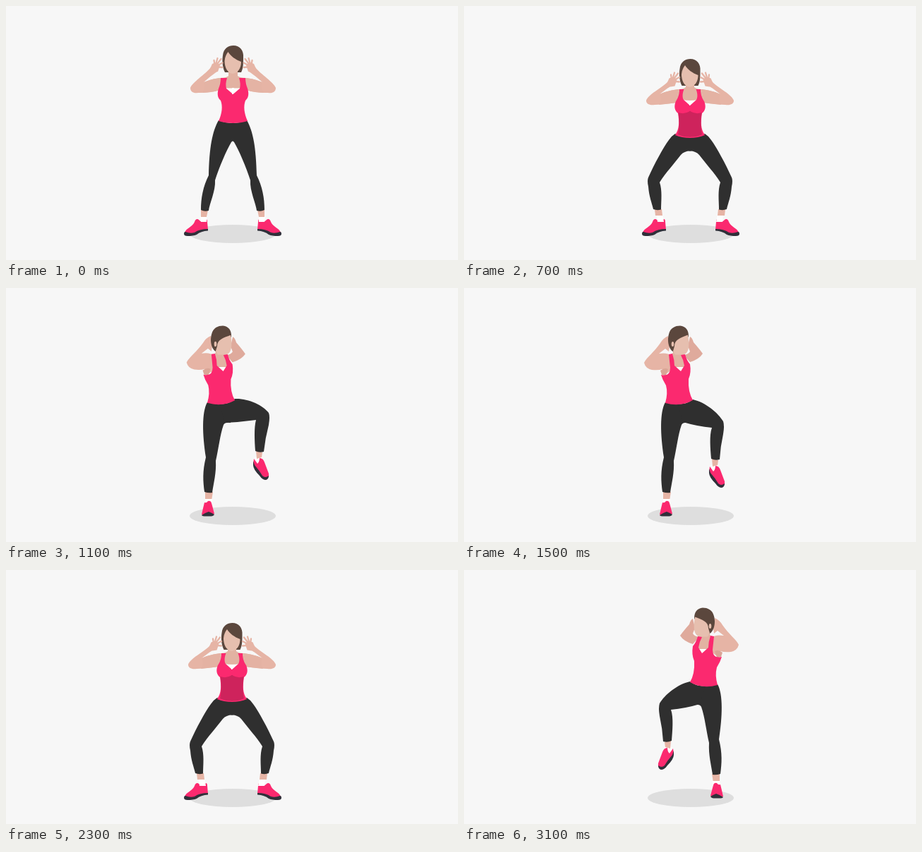
An HTML page with a canvas for the animation above (3200 ms loop, 640 by 360 pixels).

```html
<!DOCTYPE html>
<html lang="en">
<head>
<meta charset="utf-8">
<title>Squat and knee lift</title>
<style>
html, body { margin: 0; width: 100%; height: 100%; overflow: hidden; background: #f7f7f7; }
canvas { display: block; width: 640px; height: 360px; }
</style>
</head>
<body>
<canvas id="stage" width="640" height="360"></canvas>
<script>
const ctx = document.getElementById('stage').getContext('2d');
const LOOP = 3200;
const C = {
  bg: '#f7f7f7', shadow: '#dedede', pink: '#fb296f', deep: '#ce235c', black: '#2f2f2f',
  skin: '#e6b4a5', chest: '#e2b2a2', face: '#e6bfaf', shade: '#daa596', hair: '#5b473d',
  white: '#ffffff', sole: '#30303a'
};

const cache = {};
function fill(d, color) {
  ctx.fillStyle = color;
  ctx.fill(cache[d] || (cache[d] = new Path2D(d)));
}
function ellipse(x, y, rx, ry, color) {
  ctx.fillStyle = color;
  ctx.beginPath();
  ctx.ellipse(x, y, rx, ry, 0, 0, 7);
  ctx.fill();
}
function shift(x, y, draw) {
  ctx.save();
  ctx.translate(x, y);
  draw();
  ctx.restore();
}
function flip(axis, draw) {
  ctx.save();
  ctx.translate(2 * axis, 0);
  ctx.scale(-1, 1);
  draw();
  ctx.restore();
}
function both(axis, draw) {
  draw();
  flip(axis, draw);
}

// Front view: left halves, mirrored on their axis
const stand = {
  axis: 321.5, legAxis: 321, head: [0, 0], hand: [0, 0], armShade: '#e4b3a4',
  arm: 'M303 102C294 103 288 105 280 108Q290 99 300 92L290 87C282 97 264 108 261 116C261 122 266 124 272 123C284 123 295 122 302 119Z',
  upper: 'M280 108C288 105 294 103 303 102L302 119C295 122 288 122 278 123Q284 115 280 108Z',
  chest: 'M315 88V99Q312 102 303 102L302 120L323 126V88Z',
  bra: 'M310 116Q316 117 323 116V127Z',
  top: 'M304 102H313C311 108 311 113 312 117L321.5 125H323V166C314 166 307 165 301 163C306 152 307 142 304 134C299 130 299 123 301 117C303 112 304 107 304 102Z',
  leg: 'M301 162C292 178 288 200 287 240C279 256 276 272 276 289Q281 292 287 290C288 280 297 262 296 247C302 228 312 205 319 193Q320 191 323 191V166Q310 166 301 162Z',
  ankle: 'M276 289H286L284 299H276Z',
  sock: 'M275 298H284L284 306H276Z'
};
const dip = {
  axis: 320, legAxis: 320, head: [-1.5, 19], hand: [-1.5, 20.5], armShade: '#e4b2a3',
  arm: 'M304 118C294 119 286 121 277 125Q288 116 299 110L289 107C280 116 260 126 258 134C258 139 263 141 270 140C284 139 294 138 300 137Z',
  upper: 'M277 125C287 121 294 119 304 118L300 137C294 138 286 139 276 140Q281 133 277 125Z',
  chest: 'M314 107V115Q311 118 304 118L300 136L321 142V107Z',
  bra: 'M309 133Q315 134 321 134V143Z',
  top: 'M305 118H311.5C309 124 309 130 311 133L320 141H321V187Q308 187 299 183C305 174 305 165 303 152C298 148 297 142 300 135C304 129 305 124 305 118Z',
  panel: 'M303.5 151Q312 154 320 149H321V185.5Q311 186 303 182Q306 168 303.5 151Z',
  leg: 'M299 181Q294 184 290 190C282 201 270 223 261 243Q259 247 261 256C262 270 266 279 268 288Q273 290 279 288.5C279 276 281 262 277 250C285 237 298 223 307 211Q312 205.5 320 205.5H321V186Q308 186 299 181Z',
  ankle: 'M270 288H280L281 297H271Z',
  sock: 'M273 296H281L283 306H274Z'
};
const squat = {
  axis: 320, legAxis: 321.5, head: [-1, 50], hand: [-2, 52], armShade: C.shade,
  arm: 'M304 149C295 150 288 152 280 155Q290 147 300 141L289 138C280 147 259 155 256 163C257 168 264 169 270 168C284 169 294 170 298 171Z',
  upper: 'M280 155C288 151 295 149 304 149L298 171C292 168 280 168 270 168Q280 161 280 155Z',
  chest: 'M314 138V146Q311 149 303 149L298 171L321 177V138Z',
  bra: 'M308 168H321V178Z',
  top: 'M304 148H310C308 155 307 161 309 168L320 177H321V190H301V185C296 181 294 175 298 169C302 162 303 155 304 148Z',
  panel: 'M301 185Q311 189 320 184H321V217Q307 217 298 212Q305 204 303 197Z',
  leg: 'M299 211C285 219 262 232 252 244Q248 249 250 259Q258 274 264 290Q270 292 276 288C274 278 278 264 274 254C290 250 306 242 314 238Q317 236 323 236V216Q308 217 299 211Z',
  ankle: 'M266 291L277 289L279 299L269 300Z',
  sock: 'M270 299L280 297L283 306H274Z'
};

function frontHead() {
  fill('M310 94C306 86 306 76 307 70C308 60 315 56 322 56C331 56 337 63 336 73C336 82 336 88 333 94Z', C.hair);
}
function frontFace() {
  fill('M314.5 65C318 71 325 76 333 79C333 87 329 95 321 96C313 95 309.5 86 309.5 78C310 72 312 68 314.5 65Z', C.face);
}
function frontHand() {
  fill('M288 91L292 82Q298 78 303 84L300 93L294 94Z', C.skin);
  ctx.strokeStyle = C.skin;
  ctx.lineCap = 'round';
  ctx.lineWidth = 2.3;
  ctx.beginPath();
  for (const [x, y] of [[294.5, 77], [299.5, 74], [304.5, 75], [306.5, 80.5], [306.5, 87]]) {
    ctx.moveTo(296, 86);
    ctx.lineTo(x, y);
  }
  ctx.stroke();
}
function sideShoe() {
  fill('M253 321C255 315 264 313 267 306C268 302 271 301 273 303Q276 307 281 305L283 302Q285 302 285 306L286 317Q276 318 270 322Q262 325 254 324Z', C.pink);
  fill('M252 323Q252 320 254 320Q261 323 267 321Q274 316 286 316V318.5Q276 319 270 324Q265 326 257 326Q252 326 252 323Z', C.sole);
}
function front(p) {
  both(321, sideShoe);
  both(p.legAxis, () => {
    fill(p.sock, C.white);
    fill(p.ankle, C.skin);
    fill(p.leg, C.black);
  });
  shift(...p.head, frontHead);
  both(p.axis, () => {
    fill(p.arm, C.skin);
    fill(p.upper, p.armShade);
    shift(...p.hand, frontHand);
    fill(p.chest, C.chest);
  });
  both(p.axis, () => {
    fill(p.bra, C.white);
    fill(p.top, C.pink);
  });
  if (p.panel) both(p.axis, () => fill(p.panel, C.deep));
  shift(...p.head, frontFace);
}

// Turned view, facing right
const turn = {
  head: [0, 0], lean: 0, farColor: C.skin,
  far: 'M321 69Q327 67 336 72C341 79 351 89 355 95Q354 100 348 103Q336 108 325 110L318 96Q328 95 335 91L334 86L324 83L330 79L321 78Z',
  near: 'M294 70C284 73 274 81 268 88C262 94 253 99 251 105Q252 112 259 113Q273 114 283 112L288 124L297 110V95Q286 94 271 98L281 86L294 89V86L287 82L294 81Z',
  chest: 'M300 84V92Q299 96 291 97L292 118L309 121L322 110L316 95L314 84Z',
  bra: 'M302 112H317L310 121Z',
  top: 'M291 97L296 96Q299 102 299 110L309 119L316 111Q315 103 312 97L318 95Q321 104 327 112Q328 122 324 130Q322 145 329 160Q308 163 290 160Q293 145 291 135Q286 128 285 123Q294 116 291 97Z',
  support: 'M290 159C282 174 280 208 284 236C280 258 280 274 281 289Q287 291 293 290C295 276 299 262 298 246C302 228 305 210 309 200Q312 194 318 196L328 160Z',
  swing: 'M300 161Q315 162 329 159C337 177 347 199 354 225Q359 248 360 269Q354 272 348 271C345 257 339 246 336 232C331 220 318 211 312 198Z',
  ankle: 'M349 270L360 269L361 280L351 282Z',
  sock: 'M351 281L361 279L363 288L354 290Z',
  shoe: 'M353 287Q357 289 358 285L363 285Q365 288 368 296Q372 306 371 313Q368 318 363 317Q357 313 355 301Z',
  sole: 'M357 310Q362 315 371 310L371 314Q368 318 364 318Q358 316 357 310Z'
};
const lift = {
  head: [-4, -1.5], lean: 0, farColor: '#dfaa9c',
  far: 'M320 69Q323 70 325 77Q333 86 338 93Q333 101 320 105L311 95Q318 94 320 90L317 82Z',
  near: 'M289 68Q282 71 278 78C270 90 258 99 255 106Q257 114 266 116Q275 117 281 115L283 124L294 116V96Q288 91 276 93L285 86L290 90L291 83Z',
  pit: 'M278 117Q284 112 289 115L286 124L280 123Z',
  chest: 'M296 82V91Q295 95 290 96L291 120L307 121L318 108L312 94L311 82Z',
  bra: 'M300 112H313L308 121Z',
  top: 'M290 94L295 93Q298 102 298 110L307 118L312 110Q311 102 307 95L313 94Q315 102 320 108Q322 120 318 129Q317 147 324 159Q306 169 285 163Q289 149 286 138Q281 130 279 123Q292 126 292 113Z',
  support: 'M285 162C277 176 278 208 283 240C278 260 279 274 281 289Q287 291 292 290C294 276 298 262 297 245C301 228 303 208 308 194Q310 190 318 191L324 160Q306 168 285 162Z',
  swing: 'M303 166Q315 165 324 158C342 162 360 177 367 189Q369 195 367 207Q363 225 362 243Q356 245 350 242C349 229 347 209 351 198Q330 196 310 190Z',
  ankle: 'M351 242L360 244L359 251L352 253Z',
  sock: 'M349 251L359 250L359 258L351 260Z',
  shoe: 'M348 253Q351 257 353 260Q356 257 356 252Q361 252 363 258L369 274Q370 280 365 283Q360 281 357 276Q349 269 347 261Z',
  sole: 'M347 256L349 262Q356 270 360 277Q364 281 369 277Q369 282 365 283Q360 283 356 277Q347 268 347 262Z'
};
const knee = Object.assign({}, lift, {
  lean: 0.012,
  swing: 'M303 166Q315 165 324 157C342 156 364 166 372 177Q374 182 372 194Q367 213 365 232Q359 234 353 231C352 217 351 198 354 187Q332 190 310 191Z',
  foot: [3, -11]
});

function turnedHead() {
  fill('M301 92C295 90 291 78 294 67C296 58 303 55 310 55C318 56 322 61 322 70L316 80L303 92Z', C.hair);
  fill('M321 68C310 72 302 75 302 84L300 91L303 96H315Q321 94 322 86Q323 78 321 68Z', C.face);
  ellipse(299.5, 81, 1.8, 3.6, C.face);
}
function frontShoe() {
  fill('M282 289H293L291 301H282Z', C.skin);
  fill('M282 299H292V306H282Z', C.white);
  fill('M277 321Q279 312 281 304Q284 305 286 302Q290 301 291 305Q293 312 295 320Q286 325 277 321Z', C.pink);
  fill('M277 322Q281 319 287 317Q292 319 295 321Q294 324 286 323.5Q278 324 277 322Z', C.sole);
}
function turned(p) {
  frontShoe();
  shift(...(p.foot || [0, 0]), () => {
    fill(p.sock, C.white);
    fill(p.ankle, C.skin);
    fill(p.shoe, C.pink);
    fill(p.sole, C.sole);
  });
  fill(p.support, C.black);
  fill(p.swing, C.black);
  ctx.save();
  ctx.translate(304, 163);
  ctx.rotate(p.lean);
  ctx.translate(-304, -163);
  fill(p.far, p.farColor);
  fill(p.chest, C.chest);
  fill(p.near, C.skin);
  if (p.pit) fill(p.pit, C.shade);
  shift(...p.head, turnedHead);
  fill(p.bra, C.white);
  fill(p.top, C.pink);
  ctx.restore();
}

// Half-loop timing: [start, pose]
const beats = [[0, stand], [200, dip], [300, squat], [700, dip], [800, turn], [1000, lift], [1100, knee], [1500, lift]];

function draw(t) {
  const half = LOOP / 2;
  const pose = beats.filter(b => b[0] <= t % half).pop()[1];
  ctx.fillStyle = C.bg;
  ctx.fillRect(0, 0, 640, 360);
  ellipse(321, 323, 61, 13, C.shadow);
  if (pose.axis) front(pose);
  else if (t < half) turned(pose);
  else flip(322, () => turned(pose));
}

const start = performance.now();
function tick(now) {
  draw(Math.max(0, now - start) % LOOP);
  requestAnimationFrame(tick);
}
draw(0);
requestAnimationFrame(tick);
</script>
</body>
</html>
```
